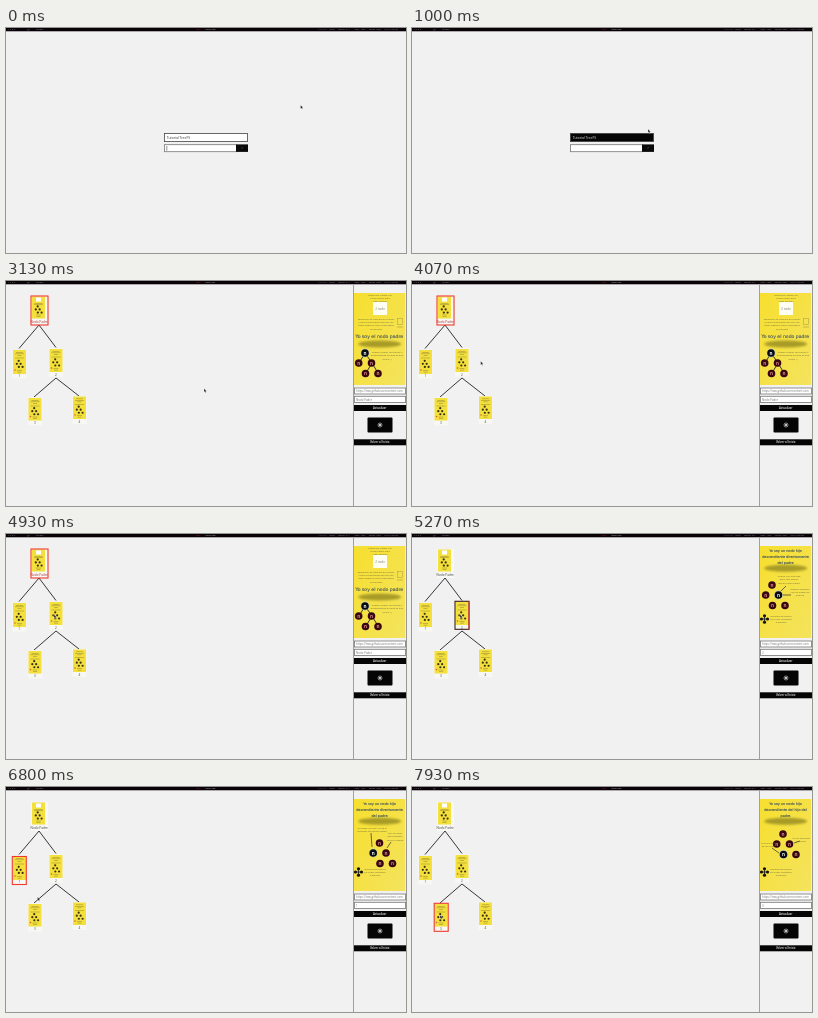
An HTML page that plays this animation: 400 by 225 pixels, repeating every 8 s.

```html
<!DOCTYPE html>
<html lang="es">
<head>
<meta charset="utf-8">
<style>
html, body { margin: 0; width: 100%; height: 100%; overflow: hidden; background: #f2f1f2; }
svg { display: block; width: 400px; height: 225px; font-family: "Open Sans", sans-serif; }
.wide { font-family: "DejaVu Sans", sans-serif; stroke: #4a5a5c; stroke-width: .12px; }
</style>
</head>
<body>
<svg id="stage" viewBox="0 0 400 225"></svg>
<script>
const LOOP = 8000;
const YELLOW = '#f4e03c', RED = '#f03a2c', NAVY = '#44545a', MAROON = '#360912';
const DEFS = `<defs>
  <filter id="soft" x="-20%" y="-50%" width="140%" height="200%"><feGaussianBlur stdDeviation="1"/></filter>
  <linearGradient id="paper" x1="0" y1="0" x2="1" y2="1">
    <stop stop-color="#f7df2e"/><stop offset="1" stop-color="#f4e35e"/>
  </linearGradient></defs>`;

const rect = (x, y, w, h, fill, extra = '') =>
  `<rect x="${x}" y="${y}" width="${w}" height="${h}" fill="${fill}" ${extra}/>`;
const dot = (x, y, r, fill, extra = '') => `<circle cx="${x}" cy="${y}" r="${r}" fill="${fill}" ${extra}/>`;
const line = (x1, y1, x2, y2, color = '#222', w = .9) =>
  `<path d="M${x1} ${y1}L${x2} ${y2}" stroke="${color}" stroke-width="${w}"/>`;
const text = (s, x, y, size, fill = '#333', anchor = 'start', extra = '') =>
  `<text x="${x}" y="${y}" font-size="${size}" fill="${fill}" text-anchor="${anchor}" ${extra}>${s}</text>`;
const lines = (list, x, y, step, size, fill = '#62643f', extra = '') =>
  list.map((s, i) => text(s, x, y + i * step, size, fill, 'middle', extra)).join('');
const field = (x, y, w, h) => rect(x, y, w, h, '#fff', 'stroke="#777" stroke-width=".8"');

// Cards of the tree: yellow area, label and selection frame
const nodes = [
  { x: 26, y: 15.5, h: 22, label: 'Nodo Padre', labelY: 41.6, frame: [25, 15, 17, 29] },
  { x: 43.5, y: 68, h: 23, label: '2', labelY: 94.8, frame: [43, 67.3, 14, 28] },
  { x: 7, y: 69, h: 24, label: '1', labelY: 96.3, frame: [6.3, 69.5, 14, 28] },
  { x: 22.5, y: 117, h: 22.5, label: '3', labelY: 143, frame: [22.2, 116.3, 14, 28] },
  { x: 67, y: 115.5, h: 22.5, label: '4', labelY: 142, frame: [66.5, 115, 14, 28] }
];
const edges = [[33, 44, 13, 67.5], [33, 44, 50, 66.5], [50, 97, 28, 116], [50, 97, 73, 115]];

// Small graph: offsets of its nodes from the top one
const cluster = [[0, 0], [-6.3, 10], [6.5, 10], [.5, 20.5], [13, 20.5]];

// Preview pages: top of the graph, index of its black node, captions as [lines, x, y]
const pages = [
  { top: [359, 72], self: 0, notes: [
    [['Aplicacion creada con', 'Three nodos para', 'crear arboles'], 374, 14.5],
    [['aplicacion de creacion por nodos', 'y busca relacionado de uno con', 'todos padres e hijos conectados', 'al principal'], 370, 38.5],
    [['Cuadro creado con bucles y', 'posiblemente el nodo es que', 'cursor :)'], 381, 72]] },
  { title: ['Yo soy un nodo hijo', 'descendiente directamente', 'del padre'],
    top: [360, 51], self: 2, arrows: [[374, 52, 368, 58], [379, 61, 371, 61]], notes: [
    [['Ocurre con una idea', 'pero sigo siendo', 'hijo del nodo padre'], 377, 43],
    [['Estaba creciendo', 'son un origen de', 'nodo id'], 388, 55.5]] },
  { title: ['Yo soy un nodo hijo', 'descendiente directamente', 'del padre'],
    top: [373.5, 56], self: 1, arrows: [[365, 46, 366, 60], [385, 55, 381, 61]], notes: [
    [['Yo puedo ser tipo con id el', 'animales del mismo padre'], 366, 41.5],
    [['son un nodo', 'descendiente', 'como le queda'], 389, 47]] },
  { title: ['Yo soy un nodo hijo', 'descendiente del hijo del', 'padre'],
    top: [371, 47], self: 3, arrows: [[360, 61, 367, 66], [388, 54, 382, 56]], notes: [
    [['Yo soy el hijo', 'de mi nodo'], 356, 57],
    [['Yo soy hermano', 'del nodo'], 389, 51.5]] }
];

function topBar(t) {
  const gray = '#98939a', label = (s, x, color = gray) => text(s, x, 2.4, 2.5, color);
  const seconds = 28 + Math.floor((t + 730) / 1000);
  return rect(0, 0, 400, 3.3, '#090207') +
    label('1  2  3  4', 1.5) + label('[]=', 21) + label('TreeFS', 30) +
    label('REC', 190, '#a5172d') + label('00:01:' + seconds, 199.5, '#ddd') +
    label('Volume', 312, '#625b62') + label('100%', 322.5) + label('Temp: 47°', 332) +
    label('Cpu: 10%', 348.5) + label('Mem: 39%', 363) + label('Fri 21:49:30', 378.5);
}

function form(t) {
  const hover = t >= 1000;
  return rect(158.4, 105.4, 83.2, 8.2, hover ? '#050505' : '#fff', 'stroke="#444" stroke-width=".8"') +
    text('Tutorial TreeFS', 160.7, 110.9, 3.4, hover ? '#eee' : '#333') +
    field(158.4, 116.7, 72, 7) + rect(230, 116.4, 12, 7.5, '#090909') +
    text('&gt;', 236, 121.4, 3, '#999', 'middle') +
    (t < 70 ? line(160.8, 118, 160.8, 122.6, '#444', .6) : '');
}

function card(n, i, selected) {
  const c = n.x + 6.5, m = n.y + n.h * .45;
  const [fx, fy, fw, fh] = n.frame;
  const bar = (dy, w) => rect(c - w / 2, n.y + dy, w, .6, '#a39733');
  let s = rect(fx, fy, fw, fh, '#f7f7f4') + rect(n.x, n.y, 13, n.h, YELLOW) +
    (i ? bar(2, 7) + bar(3.5, 9) + bar(5, 4) : rect(c - 2.5, n.y + 1, 5, 4, '#fff') + bar(6.5, 8)) +
    bar(7.7, 9) + cluster.map(([x, y]) => dot(c - .8 + x * .3, m + y * .3, 1.1, '#3a3012')).join('') +
    bar(n.h - 3.8, 5) + bar(n.h - 2.2, 4) + (i ? dot(n.x + 2, n.y + n.h - 4, .8, '#d5602c') : '') +
    text(n.label, i ? c : c + .7, n.labelY, 3.1, selected && !i ? '#a33' : '#444', 'middle');
  if (selected) {
    s += rect(fx, fy, fw, fh, 'none', `stroke="${i == 1 ? '#3b1d1a' : RED}" stroke-width="1.1"`);
    if (i == 1) s += line(fx + fw, fy, fx + fw, fy + fh, RED, 1.1);
  }
  return s;
}

function graph([x, y], self) {
  return cluster.map(([dx, dy], i) => {
    const px = x + dx, py = y + dy;
    return (i == self ? dot(px, py, 4.4, '#c6d3b8') : '') +
      dot(px, py, 3.8, i == self ? '#080b12' : MAROON) +
      text('n', px, py + 1.6, 4.6, i == self ? '#fff' : '#e58a8f', 'middle', 'font-weight="700"');
  }).join('');
}

function preview(i) {
  const p = pages[i];
  let s = rect(348, 12, 51.2, 92, 'url(#paper)') +
    `<ellipse cx="373.7" cy="${i ? 34.3 : 63}" rx="21.5" ry="3.5" fill="#a99c27" filter="url(#soft)"/>`;
  if (i) {
    s += lines(p.title, 373.5, 18, 6, 3.4, NAVY, 'class="wide"') +
      [[0, -3.2], [-3, 0], [3, 0], [0, 3.2]].map(([x, y]) => dot(352.5 + x, 85 + y, 1.6, '#111')).join('') +
      line(349.5, 85, 355.5, 85) + line(352.5, 82, 352.5, 88) +
      lines(['aplicacion de creacion', 'por nodos conectados', 'al principal'], 369, 83, 2.9, 2.1);
  } else {
    s += rect(367, 21, 14, 13, '#fffef3') + text('2 node', 374, 28.8, 3, '#777', 'middle') +
      text('Yo soy el nodo padre', 373.3, 56.7, 4.6, NAVY, 'middle', 'class="wide"') +
      rect(391.5, 37.5, 5, 6, 'none', 'stroke="#a99a45" stroke-width=".5"') + line(391, 46, 397, 46, '#a99a45', .6) +
      line(359, 72, 353, 82) + line(359, 72, 366, 82) + line(366, 82, 360, 92) + line(366, 82, 372, 92);
  }
  return s + (p.arrows || []).map(a => line(...a, '#333', .7)).join('') + graph(p.top, p.self) +
    p.notes.map(([list, x, y]) => lines(list, x, y, 3.4, 2.4)).join('');
}

function panel(i) {
  const button = (s, y) => rect(348, y, 52, 6, '#050505') +
    text(s, 373.7, y + 4, 2.8, '#eee', 'middle', 'font-weight="600"');
  return line(347.5, 4, 347.5, 225, '#8c8c8c', .8) + preview(i) +
    field(348.4, 107, 51.2, 6) + text('https://raw.githubusercontent.com', 350, 111.1, 2.9, '#777') +
    field(348.4, 115.3, 51.2, 6.2) + text(nodes[i].label, 350, 119.5, 2.9, '#777') +
    button('Actualizar', 124) + rect(361.5, 136.5, 25, 15, '#050505', 'rx="1"') +
    dot(374, 144, 2, 'none', 'stroke="#ddd" stroke-width=".6"') + dot(374, 144, 1, '#fff') +
    button('Volver al Inicio', 158.3);
}

// Pointer path as [time, x, y]
const path = [
  [0, 294.5, 77], [270, 294.5, 77], [730, 236, 101], [1000, 236, 101], [1070, 229, 106], [2730, 229, 106],
  [3080, 198, 107.5], [3440, 198, 107.5], [3530, 79, 80], [3800, 79, 80], [4500, 48, 80.5], [5960, 48, 80.5],
  [6300, 12, 83], [6600, 12, 83], [6800, 31.5, 110], [7250, 28, 128], [LOOP, 28, 128]
];

function pointer(t) {
  const k = path.findIndex(p => p[0] > t);
  const [t0, x0, y0] = path[k - 1], [t1, x1, y1] = path[k];
  const u = (t - t0) / (t1 - t0), e = u * u * (3 - 2 * u);
  return `<path transform="translate(${x0 + (x1 - x0) * e} ${y0 + (y1 - y0) * e})"
    d="M0 0V3.7L.9 3L1.5 4.3L2.2 4L1.6 2.7H2.7Z" fill="#111" stroke="#fff" stroke-width=".35"/>`;
}

function draw() {
  const t = performance.now() % LOOP;
  const selected = [5130, 6300, 7530].filter(start => t >= start).length;
  const view = t < 2730 ? form(t) :
    edges.map(e => line(...e)).join('') +
    nodes.map((n, i) => card(n, i, i == selected)).join('') + panel(selected);
  stage.innerHTML = DEFS + rect(0, 0, 400, 225, '#f2f1f2') + view + topBar(t) + pointer(t);
  requestAnimationFrame(draw);
}

const stage = document.getElementById('stage');
draw();
</script>
</body>
</html>
```
